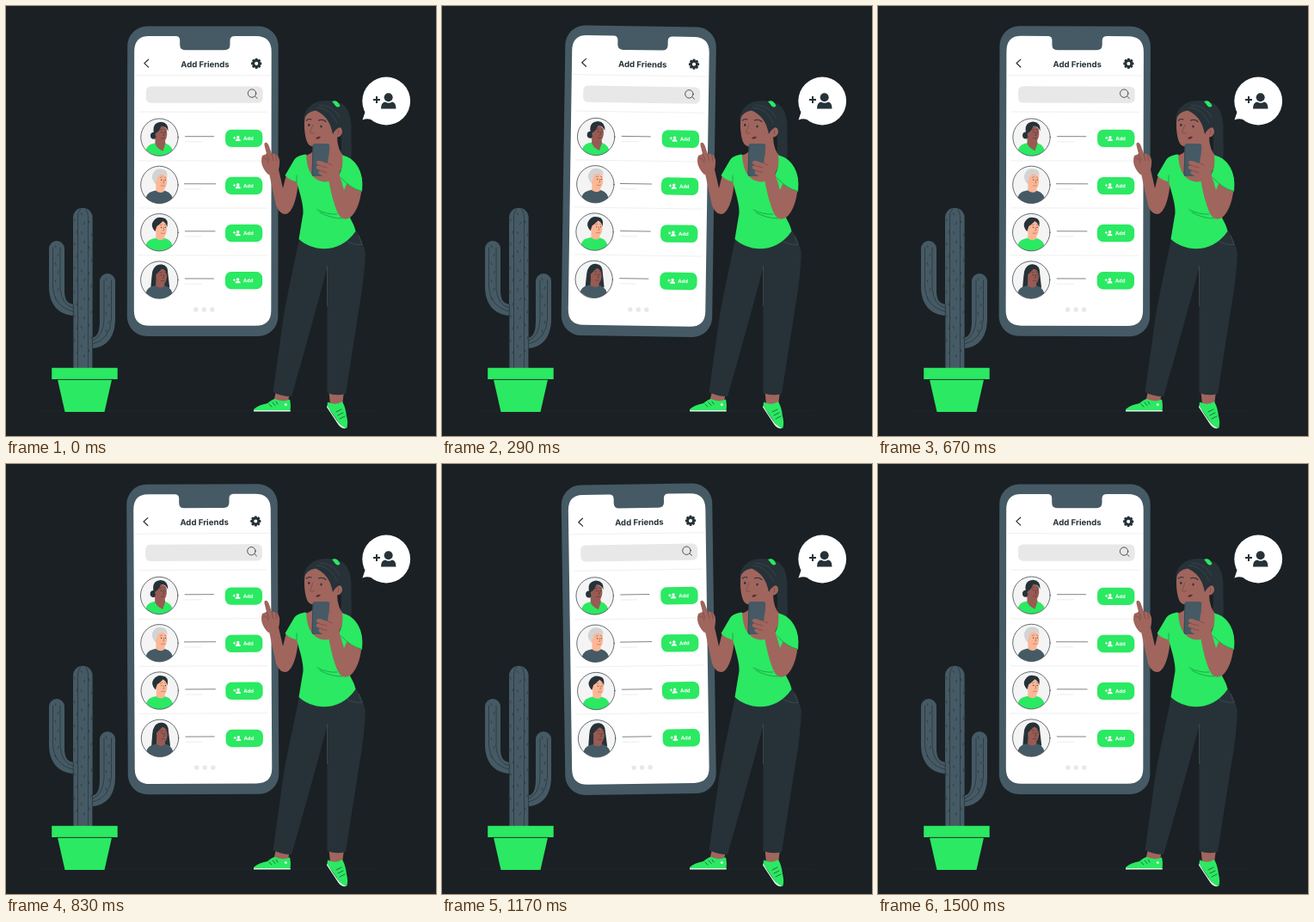
Recreate the animation shown at these times as an HTML page. Size 500 px wide and 500 px high, loop 1540 ms.

```html
<!DOCTYPE html>
<html lang="en">
<head>
<meta charset="utf-8">
<title>Add Friends</title>
<style>
html, body { margin: 0; width: 100%; height: 100%; overflow: hidden; background: #1a2024; }
svg { display: block; width: 100vw; height: 100vh; }
text { font-family: Inter, "Open Sans", sans-serif; font-weight: 700; }
.g { fill: #2be962; }
.d { fill: #263238; }
.s { fill: #455a64; }
.k { fill: #a0655d; }
.ln { fill: none; stroke: #263238; stroke-linecap: round; stroke-linejoin: round; }
.fold { fill: none; stroke: #179b42; stroke-width: .8; stroke-linecap: round; }
.crease { fill: none; stroke: #70413f; stroke-width: .6; stroke-linecap: round; }
</style>
</head>
<body>
<svg viewBox="0 0 500 500">
  <defs>
    <clipPath id="disc"><circle r="21.500"/></clipPath>
  </defs>
  <path d="M40 471H432" stroke="#222b31" stroke-width=".6"/>

  <g id="cactus">
    <path class="s" d="M50 282a9 9 0 0 1 18 0V331C68 341 71 346 79 347V360C60 359 50 346 50 326Z"/>
    <path class="s" d="M127 320a9 9 0 0 0-18 0V364C109 376 108 384 100 386V398C119 397 127 382 127 364Z"/>
    <path class="s" d="M78 421V246a11.300 11.300 0 0 1 22.600 0V421Z"/>
    <g class="ln" stroke-width=".7">
      <path d="M83.500 421V245Q84 238 87 236M95.500 421V245Q95 238 92 236M78.300 421V347M100.500 421V386"/>
      <path d="M54.500 281V326Q56 350 78 355M63 281V329Q65 348 78 351"/>
      <path d="M122.500 319V364Q121 388 101 393M114 319V365Q113 384 101 389"/>
    </g>
    <g id="spines" class="ln" stroke-width=".7"></g>
    <path class="g" d="M53.200 420.700H129.700V434H53.200ZM60 434.500H123L114.500 472H68.500Z"/>
    <path d="M59 434.300H124" stroke="#1a2024" stroke-width=".7"/>
  </g>

  <g id="phone">
    <rect class="s" x="141" y="23.500" width="175.500" height="360.500" rx="23"/>
    <path fill="#fff" d="M166 35H197Q202 35 202 40V45Q202 51.200 208 51.200H254Q260.300 51.200 260.300 45V40Q260.300 35 266 35H290.500Q308.500 35 308.500 53V354Q308.500 371.800 290.500 371.800H167Q149 371.800 149 354V53Q149 35 166 35Z"/>
    <path class="ln" stroke-width="1.200" d="M165.500 62.300L160.700 66.700L165.500 71.200"/>
    <text class="d" x="231.300" y="71.200" font-size="9.600" text-anchor="middle">Add Friends</text>
    <g id="gear" class="d" transform="translate(291 66.800)"></g>
    <path d="M150 80.800H308M154 123.200H304M154 180H304M154 235H304M154 290H304" stroke="#e8e8e8" stroke-width=".7"/>
    <rect x="162.700" y="93.500" width="135.800" height="19.200" rx="5.500" fill="#e8e8e8"/>
    <path class="ln" stroke-width=".8" d="M289.500 105L292 107.300"/>
    <circle class="ln" stroke-width=".8" cx="285.900" cy="101.500" r="4.700"/>
    <g id="rows"></g>
    <g fill="#e8e8e8"><circle cx="221" cy="353" r="2.700"/><circle cx="230.500" cy="353" r="2.700"/><circle cx="240" cy="353" r="2.700"/></g>
  </g>

  <g id="woman">
    <!-- ponytail -->
    <path class="d" d="M382 112C394 111 402 123 401.500 143C401 160 403 169 400.500 182L388 178C392 163 390 140 383 118Z"/>
    <!-- shoes and ankles -->
    <path class="k" d="M314 448H330L328 461H311ZM375.500 448H393L391 464H377Z"/>
    <path class="g" d="M288 469Q293 464 304 462Q310 457 313 457Q321 461 330 457.500Q331.500 463 330.500 471H288Z"/>
    <path d="M288 470H330.700V471.500H288Z" fill="#d8f8e2"/>
    <path class="g" d="M374 460.500Q383 465 391 460Q395 467 396 477Q398 484 396.500 490.500Q392 492 388 486L373.500 465Z"/>
    <path d="M373.500 464.500Q381 477.500 388 486Q392 490 395.500 491Q390 492 386.500 487L373 466.500Z" fill="#d8f8e2"/>
    <circle cx="325.300" cy="463.500" r="1.500" fill="#d8f8e2"/>
    <path class="ln" stroke-width=".7" d="M306 463L309 466M310 461L313 464.500M314 460L316 463M384 472L390 469M386 476L392 473M388 480L394 477"/>
    <!-- trousers -->
    <path class="d" d="M342 266C335 300 326 340 322 366L310.500 449Q320 454 332 454Q352 385 373.500 304L373.500 450Q384 454 395 451L411 349Q417 314 418 287Q415 273 407 261Z"/>
    <path d="M373.500 302V349" fill="none" stroke="#46545b" stroke-width=".7"/>
    <path d="M396 273Q403 278 414 277.500M410 267L414 277" fill="none" stroke="#46545b" stroke-width=".7"/>
    <!-- pointing arm -->
    <path class="k" d="M326 196L340 202C339 219 335 237 327 241.500Q319 244 314 232L306 195L317 190L322 212Z"/>
    <path class="k" d="M305 196C299 190 295 182 298 174L303 172L300.500 162Q300 158.500 302.500 158.700Q304.500 159 305.500 162L309 172Q316 170 318 179Q318.500 187 316 193Z"/>
    <path class="crease" d="M303 172L306 179M309 172L311 180M313.500 172.500L315 180M299 177Q304 176 305 182"/>
    <!-- neck and shirt -->
    <path class="k" d="M353 158L385 151Q385 168 394 176Q388 206 368 207Q350 203 346 174Q357 173 358 165Z"/>
    <path class="g" d="M349 172.500C343 173 338 175 335 179L324.500 197Q330 202.500 338 204.500C342 219 346 231 345.500 241L340.500 271C354 284 386 291 406.500 262C405 252 398 246 398 239L401 217Q409 217 414 214.500C415 196 410 178 391 173.500C393 189 388 204.500 370 204.500Q350 202 349 172.500Z"/>
    <path class="fold" d="M362 237Q374 243 385 242M365 240Q377 247 391 247M338 204.500L338 197"/>
    <!-- raised arm -->
    <path class="k" d="M413.500 213C412 228 407 241 400 246Q391 251 386 241C381 230 377 214 374.500 198L386 190C389 200 391 207 393 214L398 203Z"/>
    <path class="g" d="M390 200Q400 212 414 215.500Q416 198 409 187L394 186Z"/>
    <path class="fold" d="M390 200Q400 212 414 215.500"/>
    <!-- head -->
    <path class="d" d="M347 138C344 121 356 109 374 110C391 111 394 127 388 142L380 152L352 148Z"/>
    <path class="k" d="M348 128C346 137 347 150 350 158Q353 165 363 164C372 163 380 156 383 152Q389 154 391 147Q391 140 386 141L383 143C382 132 374 123 360 120.500Q352 121 348 128Z"/>
    <path class="d" d="M346 133Q349 123 360 121.500C370 126 377 133 380 149Q383 143 388 141Q392 128 386 118Q373 106 357 114Q346 121 346 133Z"/>
    <path d="M361 118Q377 118 385 136M364 115Q382 116 388 130" fill="none" stroke="#46545b" stroke-width=".5"/>
    <path class="g" d="M379 111Q385 108 388.500 116Q386 119 383 116Q381 113 379 111Z"/>
    <path class="ln" stroke-width="1.100" d="M349.500 133Q352 130.500 355 132M363.500 133Q368 131 372 134.500"/>
    <g class="d"><ellipse cx="352.300" cy="138.300" rx="1.100" ry="1.600"/><ellipse cx="366.500" cy="140" rx="1.100" ry="1.600"/></g>
    <path class="crease" d="M357 138Q355 143 353.500 147Q355 149 358 148M386 144Q388 145 386 149"/>
    <path fill="#5c2f31" d="M360 154Q362 151 366 152Q364 156 360 154Z"/>
    <!-- handset and fingers -->
    <path class="s" d="M359 160H373.500Q376.500 160 376.300 163L374 195Q373.800 198 371 198H358Q355.500 198 355.700 195L356.500 163Q356.700 160 359 160Z"/>
    <path d="M357 162L356 195Q356 197.500 358 197.700" fill="none" stroke="#2f3f47" stroke-width=".7"/>
    <path class="k" d="M386 195L374.500 201Q369 199 364 195Q362 192 366 191.500L361 189Q359.500 185.500 364 185.500L361 183Q360 179.500 365 180L374 183L375 175Q377 170 381 174L387 180Q390 186 386 195Z"/>
    <path class="crease" d="M364 185.500L373 188M366 191.500L373 193.500M375 183L379 185"/>
  </g>

  <g id="bubble">
    <circle fill="#fff" cx="442.200" cy="110.500" r="27.900"/>
    <path fill="#fff" d="M414.500 132.500L418 122L427 133Q421 130 414.500 132.500Z"/>
    <path d="M427 109H435M431 105V113" stroke="#263238" stroke-width="2"/>
    <circle class="d" cx="444.700" cy="106.300" r="5"/>
    <path class="d" d="M436 119.500Q436 112 441 111.500Q445 114 449 111.500Q453.500 112 453.500 119.500Z"/>
  </g>
</svg>
<script>
const $ = id => document.getElementById(id);
const DARK = '#263238', GREEN = '#2be962', SLATE = '#455a64', BROWN = '#985b54', PEACH = '#fbb796';

const shape = (fill, d) => `<path fill="${fill}" d="${d}"/>`;
const stroke = (color, d) => `<path fill="none" stroke="${color}" stroke-width=".6" stroke-linecap="round" d="${d}"/>`;
const ball = (fill, x, y, r) => `<circle fill="${fill}" cx="${x}" cy="${y}" r="${r}"/>`;

// Portraits are drawn around their disc's centre.
const shirt = c => shape(c, 'M-17 24Q-17 9-8 7.500L-2 6L7 7Q16 9 17 24Z');
const neck = c => shape(c, 'M-4 0H6V7Q2 11-4 7Z');
const face = c => shape(c, 'M-5-11Q2-16 8-10Q10-3 7 3Q3 7-2 3Q-6-1-5-11Z');
const marks = ink =>
  stroke(ink, 'M1-8.500L3-9M6-9L7.500-8.500M4.500-6L5.500-2.500L4-2M2 1Q4 2 6 .8') +
  ball(DARK, 2.2, -5.8, .6) + ball(DARK, 6.8, -5.8, .6);

const portraits = [
  ball(DARK, -6.500, -2, 4) + shirt(GREEN) + shape(BROWN, 'M-5 0H6L7 7Q5 13 4 16Q-4 12-5 7Z') +
    face(BROWN) + shape(DARK, 'M-6-3Q-10-17 2-18Q11-17 10-7Q8-13 2-13Q0-7-4-5Z') + marks('#562f30'),
  shirt(SLATE) + neck(PEACH) + face(PEACH) +
    shape('#d3d3d3', 'M-5-1Q-11-9-7-14Q-4-20 4-18Q10-17 9-9Q7-13 1-12Q-2-11-3-6Z') + marks('#a65f49'),
  shirt(GREEN) + neck(PEACH) + face(PEACH) +
    shape(DARK, 'M-5-1Q-11-8-7-13Q-3-19 4-17Q11-16 9-6Q8-11 4-13Q0-9-3-7Z') + marks('#a65f49'),
  shape(DARK, 'M-10 10Q-9-4-8-10Q-5-19 3-18Q10-17 10-8L12 9Q2 12-10 10Z') +
    shirt(SLATE) + neck(BROWN) + face(BROWN) +
    shape(DARK, 'M-6 7Q-10-2-7-11Q-2-18 3-17Q9-16 9-5Q8-11 4-14Q0-10-4-6Q-3 2-6 7Z') + marks('#562f30')
];

const lines = [[208, 242], [207, 244], [208, 243.5], [208, 242]];

$('rows').innerHTML = portraits.map((art, i) => {
  const y = i * 55.1, [a, b] = lines[i];
  return `<g transform="translate(178.400 ${152.700 + i * 55.3})">
      <circle r="21.700" fill="#f4f4f4"/>
      <g clip-path="url(#disc)">${art}</g>
      <circle class="ln" r="21.700" stroke-width=".7"/>
    </g>
    <g transform="translate(0 ${y})">
      <path d="M${a} 151.700H${b}" stroke="#263238" stroke-width=".6"/>
      <path d="M${a} 157.800H${a + 20}" stroke="#e4e4e4" stroke-width=".7"/>
      <rect class="g" x="255" y="143.700" width="43.300" height="20.300" rx="7"/>
      <g fill="#fff">
        <path d="M264 153.300H267.200M265.600 151.700V154.900" stroke="#fff" stroke-width=".9"/>
        <circle cx="269.800" cy="152.500" r="1.700"/>
        <path d="M266.800 157Q267 154.200 269.800 154.200Q272.600 154.200 272.800 157Z"/>
        <text x="276" y="156" font-size="5.900">Add</text>
      </g>
    </g>`;
}).join('');

$('gear').innerHTML =
  Array.from({ length: 8 }, (_, i) =>
    `<rect x="-1.500" y="-6.100" width="3" height="4" rx=".7" transform="rotate(${i * 45})"/>`).join('') +
  '<circle class="ln" r="3.500" stroke-width="2.500"/>';

// Short spines scattered along the ribs.
const ticks = (x, top, bottom, step) => {
  let d = '';
  for (let y = top, i = 0; y < bottom; y += step, i++)
    d += `M${x + (i % 2 ? 1 : -1)} ${y}l${i % 2 ? 1 : -1} -2.500`;
  return `<path d="${d}"/>`;
};
$('spines').innerHTML = ticks(81, 250, 415, 14) + ticks(89.5, 243, 415, 11) + ticks(98, 252, 415, 15) +
  ticks(59, 281, 345, 10) + ticks(118, 319, 380, 10);

// Sway: 0, +1, -1, 0 degrees with straight ramps, stepped at 24 pictures per second.
const LOOP = 1540, SWAY = 1500, LEAD = 25;
const sway = ms => {
  const p = ((ms + LEAD) % SWAY) / SWAY;
  return p < .25 ? p * 4 : p < .75 ? 2 - p * 4 : p * 4 - 4;
};
const draw = ms => {
  const step = Math.floor((ms % LOOP) * .024 + .1);
  $('phone').setAttribute('transform', `rotate(${sway(step / .024).toFixed(3)} 228.800 203.800)`);
};

let start;
const tick = now => {
  start ??= now;
  draw(now - start);
  requestAnimationFrame(tick);
};
draw(0);
requestAnimationFrame(tick);
</script>
</body>
</html>
```
